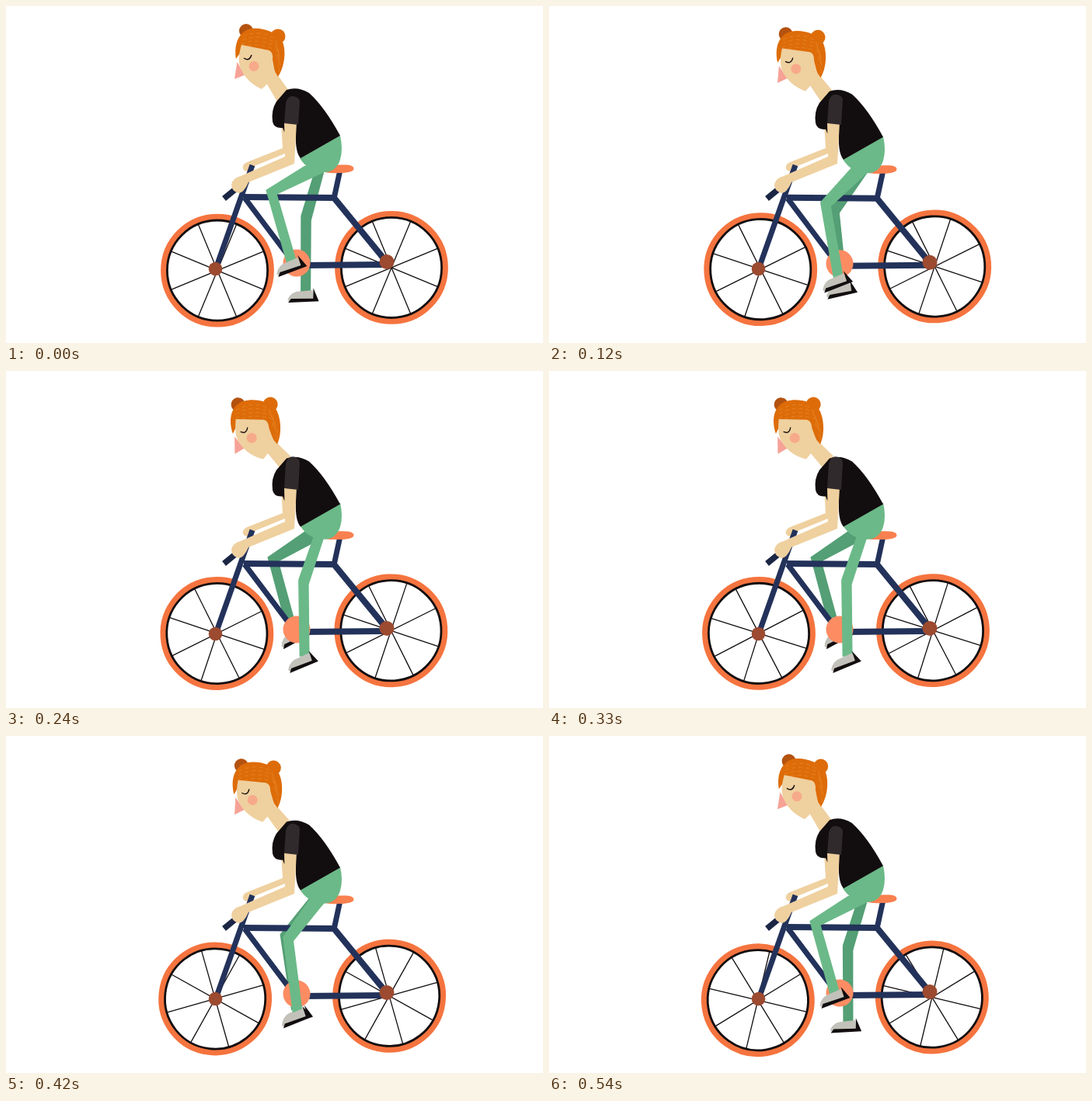
An HTML page with a canvas that plays this animation: 691 by 434 pixels, repeating every 570 ms.

```html
<!DOCTYPE html>
<html lang="en">
<head>
<meta charset="utf-8">
<title>Cyclist</title>
<style>
html, body { margin: 0; width: 100%; height: 100%; overflow: hidden; background: #fff; }
canvas { display: block; }
</style>
</head>
<body>
<canvas id="stage" width="691" height="434"></canvas>
<script>
const ctx = document.getElementById('stage').getContext('2d');
const STEP = 30, STEPS = 19, RAD = Math.PI / 180;
const C = {
  tyre: '#f5743f', seat: '#f9804f', crank: '#fd8c63', hub: '#9c4a30', navy: '#23325a', grip: '#1b2645', ink: '#120d0f',
  sleeve: '#302a2d', skin: '#efd09f', green: '#6bb988', darkGreen: '#549f75',
  shoe: '#c3c2ba', hair: '#dd6c08', bun: '#b4520f', strand: '#e8852a', nose: '#f6a296', cheek: '#f7aa8a'
};
// Wheel angle in degrees at chosen steps
const SPIN = [[0, 0], [4, -49], [8, -94], [11, -140], [13, -161], [16, -198], [18, -234], [19, -270]];

const mix = (a, b, k) => a + (b - a) * k;

function fill(color, d) {
  ctx.fillStyle = color;
  ctx.fill(new Path2D(d));
}
function poly(color, points) {
  fill(color, 'M' + points.map(p => p.join(' ')).join('L') + 'Z');
}
function stroke(color, width, d) {
  ctx.strokeStyle = color;
  ctx.lineWidth = width;
  ctx.stroke(new Path2D(d));
}
function disc(color, x, y, r) {
  ctx.fillStyle = color;
  ctx.beginPath();
  ctx.arc(x, y, r, 0, 7);
  ctx.fill();
}
function ring(color, width, r) {
  ctx.strokeStyle = color;
  ctx.lineWidth = width;
  ctx.beginPath();
  ctx.arc(0, 0, r, 0, 7);
  ctx.stroke();
}
// Draws in a frame rotated about (x, y) and shifted by (dx, dy)
function placed(x, y, degrees, dx, dy, draw) {
  ctx.save();
  ctx.translate(x + dx, y + dy);
  ctx.rotate(degrees * RAD);
  ctx.translate(-x, -y);
  draw();
  ctx.restore();
}

function spinAt(step) {
  const i = SPIN.findIndex(key => key[0] > step);
  const [s0, a0] = SPIN[i - 1], [s1, a1] = SPIN[i];
  return mix(a0, a1, (step - s0) / (s1 - s0));
}

// The wheel turns slightly off its axle
function wheel(x, y, angle) {
  ctx.save();
  ctx.translate(x, y);
  ctx.rotate(angle * RAD);
  ctx.translate(1.5, 1);
  ring(C.tyre, 7.8, 69);
  ring(C.ink, 2.8, 64.6);
  for (let i = 0; i < 4; i++) {
    const a = (22.5 + 45 * i) * RAD, cx = 64 * Math.cos(a), cy = 64 * Math.sin(a);
    stroke(C.ink, 1.3, `M${-cx} ${-cy}L${cx} ${cy}`);
  }
  ctx.restore();
}

// p: 0 = knee raised, 1 = leg stretched; the shoe hangs off the ankle by (dx, dy)
function leg(color, p, tilt, dx, dy) {
  const thigh = (143.2 - 33.5 * p) * RAD, shin = (15.9 - 16 * p) * RAD;
  const kx = 412 + 97 * Math.cos(thigh), ky = 179 + 97 * Math.sin(thigh);
  const sx = Math.sin(shin), sy = Math.cos(shin);
  const ax = kx + 98.7 * sx, ay = ky + 98.7 * sy;
  poly(color, [[mix(384, 397, p), mix(206, 212, p)], [kx, ky], [kx + 13.5, ky + 6],
    [mix(412, 409, p), mix(213, 215, p)], [402, 203]]);
  poly(color, [[kx, ky], [kx + 13.5 * sy, ky - 13.5 * sx + 4], [ax + 13 * sy, ay - 13 * sx], [ax, ay]]);
  placed(0, 0, tilt, ax + dx, ay + dy, () => {
    fill(C.shoe, 'M-12 14Q-10 2 1 -1L15-7L20 4L-10 16Z');
    fill(C.ink, 'M15-10L27 4L-10 18L-8 12L19 3Z');
  });
}

function frame() {
  stroke(C.navy, 8, 'M306 246L422 247L490 330');
  stroke(C.navy, 7, 'M307 247L371 332M430 211L422 248');
  stroke(C.navy, 8, 'M380 334L487 333');
  fill(C.seat, 'M406 206Q420 204 438 204.500Q448 205 447.500 210Q446 215 428 215Q412 216 406 212Z');
  disc(C.crank, 374, 331, 17.5);
  disc(C.hub, 490, 329.5, 9.5);
}

function head() {
  fill(C.skin, 'M343 80L364 109L350 125L335 99Z');
  disc(C.bun, 309, 32, 9);
  fill(C.hair, 'M296 68C293 48 300 32 316 29C330 27 348 34 355 44C361 56 359 78 350 91Q342 80 341 64L303 58Z');
  disc(C.hair, 350, 39, 9.5);
  ctx.setLineDash([5, 4]);
  for (let i = 0; i < 4; i++) {
    const y = 34 + i * 5;
    stroke(C.strand, .8, `M${305 - i} ${y + 5}Q${326 - i} ${y - 4} ${345 + i} ${y + 8}Q${352 + i} ${y + 16} ${348 + i} ${y + 36}`);
  }
  ctx.setLineDash([]);
  fill(C.nose, 'M297.500 72L294 94L307 89Z');
  fill(C.skin, 'M303 50L338 57Q344 59 343 69L346 85Q342 96 329 107Q309 98 302 80Q297 70 303 50Z');
  disc(C.cheek, 319, 77.5, 6.5);
  stroke(C.ink, 1.4, 'M306 67Q313 72 316 63');
}

function draw(step) {
  const p = (1 - Math.cos(2 * Math.PI * step / STEPS)) / 2;
  const spin = spinAt(step);
  ctx.clearRect(0, 0, 691, 434);
  wheel(270.5, 339.6, spin);
  wheel(494.5, 335.9, spin);

  leg(C.darkGreen, 1 - p, 18 - 27 * p, mix(-1, 3, p), 5 * Math.sqrt(p) - 1);
  fill(C.skin, 'M354 150L361 150L359 190L320 206Q311 218 305 210Q303 203 313 200L356 183Z');
  placed(0, 0, 0, 0, 2 * p, frame);
  stroke(C.navy, 7, 'M317 205L270 338');
  stroke(C.grip, 7.5, 'M280.500 248L300 232');
  disc(C.hub, 269.5, 338.5, 8.8);
  leg(C.green, p, -2 * p, -1 - 2 * p, 4 * Math.sqrt(p) - 1);

  placed(0, 0, 0, 0, 3 * p, () =>
    fill(C.green, 'M378 196L430 167Q434 184 430 198Q425 213 411 214Q390 215 378 196Z'));
  placed(345, 115, -10.5 * p, 3.5 * p, 4 * p, head);
  placed(0, 0, 0, 0, 4.8 * p, () =>
    fill(C.ink, 'M348 123L361 108Q375 103 390 112Q410 130 430 167L379 196Q372 188 373 165L358 162L356 157Q345 158 343 149Q341 134 348 123Z'));
  fill(C.skin, 'M358 150L374 150L371 203L312 227Q306 241 299 241Q290 238 290 230Q291 222 302 219L359 194Z');
  const top = mix(116, 110, p);
  fill(C.sleeve, `M358 151L360 ${top + 9}Q362 ${top} 369 ${top}Q378 ${top + 1} 378 ${top + 8}L376 153Z`);
}

function tick() {
  draw(Math.floor(performance.now() / STEP) % STEPS);
  requestAnimationFrame(tick);
}
tick();
</script>
</body>
</html>
```
